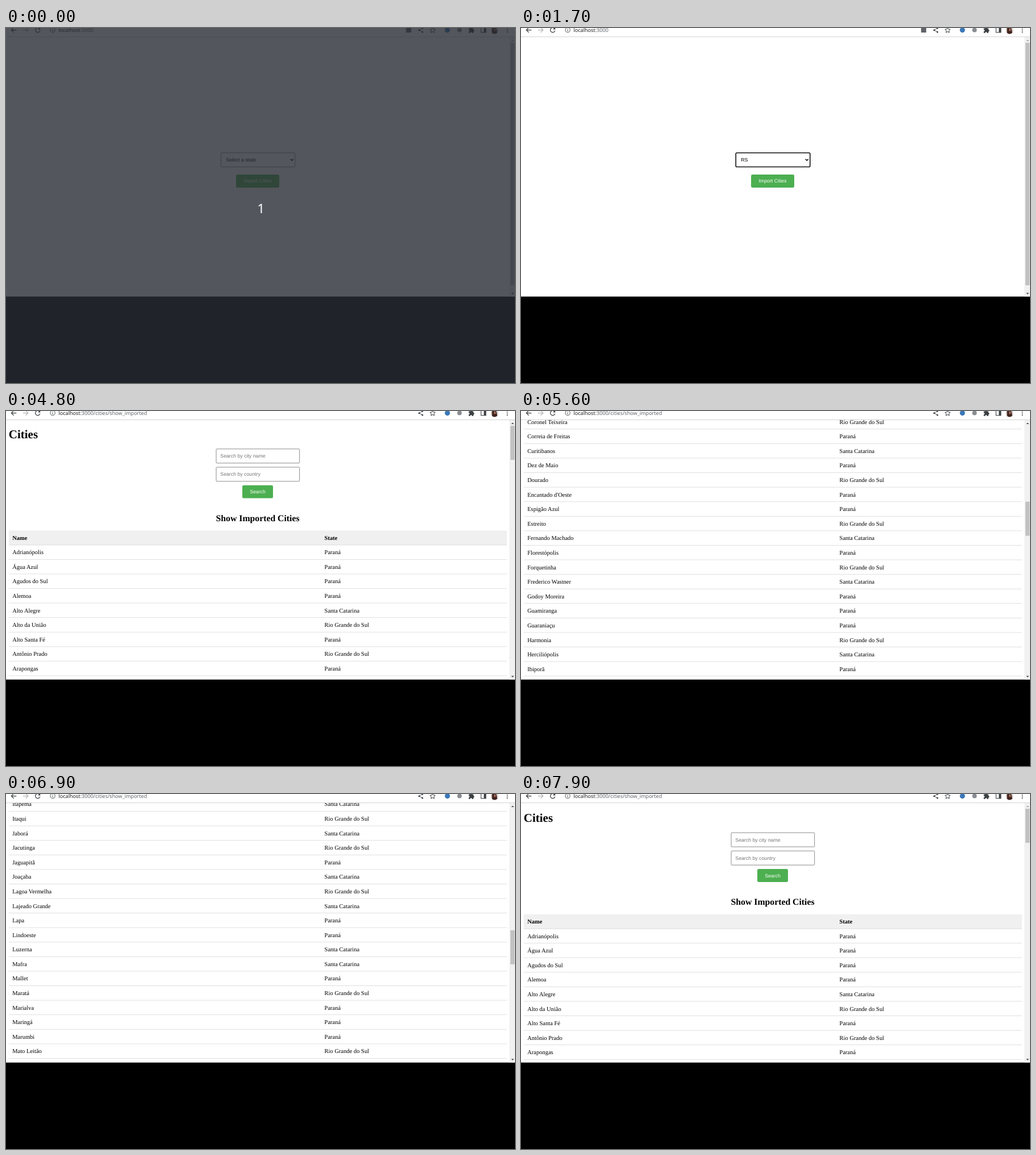
These frames come from a looping animation (896 by 625 pixels, 8000 ms). An HTML page:

```html
<!DOCTYPE html>
<html lang="en">
<head>
<meta charset="utf-8">
<title>City import</title>
<style>
  html, body { margin: 0; width: 100%; height: 100%; overflow: hidden; background: #000; }
  svg { display: block; width: 896px; height: 625px; text-rendering: geometricPrecision; }
  .sans { font: 8.75px "Liberation Sans", Arial, sans-serif; }
  .serif { font: 10.5px "Liberation Serif", "Times New Roman", serif; }
  .bold { font-weight: bold; }
  .url { font: 9.07px "Noto Sans", "Open Sans", sans-serif; fill: #5f6368; }
  .count { font: 23px "Noto Sans", "Open Sans", sans-serif; fill: #fff; }
  .icon { fill: none; stroke: #3c4043; stroke-width: 1.25; }
  .field { fill: #fff; stroke: #767676; stroke-width: .85; }
  .hint { fill: #757575; }
  .mid { text-anchor: middle; }
  .white { fill: #fff; }
</style>
</head>
<body>
<svg viewBox="0 0 896 625">
  <defs>
    <clipPath id="view"><rect y="16" width="886.2" height="456.8"/></clipPath>
    <clipPath id="face"><circle cx="860" cy="3.8" r="6.6"/></clipPath>
    <filter id="shadow" x="-10%" y="-20%" width="120%" height="150%">
      <feDropShadow dx="0" dy="1" stdDeviation="1.2" flood-opacity=".35"/>
    </filter>
  </defs>
  <rect width="896" height="625"/>
  <rect width="896" height="472.8" fill="#fff"/>

  <g clip-path="url(#view)">
    <g id="form">
      <rect id="select" x="378.2" y="219.8" width="130.6" height="24.7" rx="1.8"/>
      <text id="choice" class="sans" x="387.2" y="235.1"></text>
      <path d="M500.7 230.8l2.5 2.5 2.5-2.5" fill="none" stroke="#000" stroke-width="1.4"/>
      <rect x="405" y="258.1" width="76" height="22.8" rx="2.6" fill="#4caf50"/>
      <text class="sans mid white" x="443" y="272.4">Import Cities</text>
      <g id="popup">
        <rect x="377.8" y="245" width="131.4" height="45.4" fill="#fff" stroke="#c4c4c4" stroke-width=".6" filter="url(#shadow)"/>
        <rect id="mark" x="378.1" width="130.8" height="11.2" fill="#e95420"/>
        <g id="options" class="sans"></g>
      </g>
    </g>
    <g id="list">
      <text class="serif bold" style="font-size:21px" x="4.8" y="49.3">Cities</text>
      <rect id="byName" class="field" x="370" y="68.1" width="146.7" height="24.9" rx="1.2"/>
      <text class="sans hint" x="377.3" y="83.6">Search by city name</text>
      <rect id="byCountry" class="field" x="370" y="100.2" width="146.7" height="24.9" rx="1.2"/>
      <text class="sans hint" x="377.3" y="115.7">Search by country</text>
      <rect x="416" y="132.1" width="54" height="22.8" rx="2.6" fill="#4caf50"/>
      <text class="sans mid white" x="443" y="146.5">Search</text>
      <text class="serif bold mid" style="font-size:15.75px" x="443.1" y="195.2">Show Imported Cities</text>
      <rect x="4.8" y="211.8" width="877" height="25.6" fill="#f0f0f0"/>
      <rect x="4.8" y="236.8" width="877" height=".8" fill="#d8d8d8"/>
      <text class="serif bold" x="11.2" y="227.9">Name</text>
      <text class="serif bold" x="560.6" y="227.9">State</text>
      <g id="rows" class="serif"></g>
    </g>
  </g>

  <g id="scrollbar">
    <rect x="886.2" y="16" width="9.8" height="456.8" fill="#f1f1f1"/>
    <rect id="thumb" x="887.9" width="7.4" fill="#c1c1c1"/>
    <path id="up" d="M889.3 23.1h5l-2.5-2.7z"/>
    <path d="M889.3 466.3h5l-2.5 2.7z" fill="#505050"/>
  </g>

  <g id="toolbar">
    <rect width="896" height="16" fill="#fff"/>
    <rect y="15" width="896" height="1" fill="#d3d3d3"/>
    <path class="icon" d="M18.3 3.5H9.6M13.6-.7L9.4 3.5l4.2 4.2"/>
    <path class="icon" style="stroke:#b4b6b9" d="M30 3.5h8.7M34.7-.7l4.2 4.2-4.2 4.2"/>
    <g id="reload">
      <path class="icon" d="M59 1A4.1 4.1 0 1 0 59.8 4.6"/>
      <path d="M60.3-1.5v4.1h-4.1z" fill="#3c4043"/>
    </g>
    <path id="stop" class="icon" d="M52.2 0l7 7M59.2 0l-7 7"/>
    <circle class="icon" style="stroke-width:.9" cx="82.2" cy="3.4" r="4.1"/>
    <path class="icon" style="stroke-width:1" d="M82.2 2.9v2.8M82.2 1v1"/>
    <text class="url" x="92.4" y="6.5"><tspan fill="#202124">localhost</tspan>:3000<tspan id="path"></tspan></text>
    <rect id="badge" x="704.3" y="-1" width="9" height="9" fill="#5f6368"/>
    <path class="icon" style="stroke-width:.9" d="M733 .3l-5.6 3.4L733 7.1"/>
    <g fill="#3c4043">
      <circle cx="727.3" cy="3.7" r="1.5"/><circle cx="733" cy=".3" r="1.5"/><circle cx="733" cy="7.1" r="1.5"/>
      <circle cx="882.5" cy="-.1" r="1.05"/><circle cx="882.5" cy="3.5" r="1.05"/><circle cx="882.5" cy="7.1" r="1.05"/>
      <path d="M814.6.6h2.5a1.6 1.6 0 0 1 3.2 0h2.5v2.5a1.6 1.6 0 0 1 0 3.2v2.4h-2.5a1.6 1.6 0 0 0-3.2 0h-2.5V6.1a1.5 1.5 0 0 0 0-3z"/>
      <path d="M841.2-.8h3.6v8.6h-3.6z"/>
    </g>
    <path class="icon" style="stroke-width:1" d="M751-1.1l1.4 3.1 3.4.4-2.5 2.3.7 3.4-3-1.7-3 1.7.7-3.4-2.5-2.3 3.4-.4z"/>
    <circle cx="777" cy="3.6" r="4.6" fill="#3b78b8"/>
    <circle cx="798.3" cy="3.6" r="4" fill="#8a8d91"/>
    <rect class="icon" style="stroke-width:1.1" x="836.2" y="-.8" width="8.6" height="8.6"/>
    <g clip-path="url(#face)">
      <rect x="853" y="-3" width="14" height="14" fill="#d9cfca"/>
      <path d="M855.5 11V1.5a4 4 0 0 1 7.5-1.5l2.5 11z" fill="#40241f"/>
      <ellipse cx="860.6" cy="3" rx="1.7" ry="2.5" fill="#a9705c"/>
    </g>
  </g>

  <g id="cover">
    <rect width="896" height="625" fill="#282c34" opacity=".8"/>
    <text class="count mid" x="448.8" y="326">1</text>
  </g>
</svg>
<script>
const $ = id => document.getElementById(id);
const show = (id, on) => $(id).setAttribute("display", on ? "inline" : "none");
const set = (id, name, value) => $(id).setAttribute(name, value);

const LOOP = 8000, STEP = 100, ROW = 25.585, OPTION = 11.2;
const STATES = { P: "Paraná", R: "Rio Grande do Sul", S: "Santa Catarina" };

// Each entry starts with the initial of its state.
const TOWNS = `PAdrianópolis,PÁgua Azul,PAgudos do Sul,PAlemoa,SAlto Alegre,RAlto da União,PAlto Santa Fé,
RAntônio Prado,PArapongas,RArroio do Tigre,SArvoredo,PAssaí,SAtalanta,PBandeirantes,RBarra Funda,PBela Vista,
PBoa Esperança,RBom Jesus,SCaçador,PCambará,RCampo Bom,RCapão da Canoa,RCapão do Cedro,RCasca,RCatuípe,
PCentenário do Sul,SCentro Histórico de São José,RCerro Alto,PConcórdia do Oeste,PConselheiro Mairinck,
PCoronel Domingos Soares,RCoronel Teixeira,PCorreia de Freitas,SCuritibanos,PDez de Maio,RDourado,
PEncantado d'Oeste,PEspigão Azul,REstreito,SFernando Machado,PFlorestópolis,RForquetinha,SFrederico Wastner,
PGodoy Moreira,PGuamiranga,PGuaraniaçu,RHarmonia,SHerciliópolis,PIbiporã,SIbirama,PImbituva,RIndependência,
PIporã,PIrati,RItaara,SItapema,RItaqui,SJaborá,RJacutinga,PJaguapitã,SJoaçaba,RLagoa Vermelha,SLajeado Grande,
PLapa,PLindoeste,SLuzerna,SMafra,PMallet,RMaratá,PMarialva,PMaringá,PMarumbi,RMato Leitão,RMontenegro,PMorretes,
RNova Prata,SNova Trento,POrtigueira,RParaí,RPasso Fundo,PPeabiru,PPinhão,SPiratuba,RPlanalto,RPoço das Antas,
RPontão,PPorto Brasílio,RPulador,PRebouças,SRio Bonito,SRio Pinheiros,SRodeio,RSanta Bárbara,PSanta Bárbara,
SSanta Lúcia,PSanta Zélia,RSanto Antônio,RSanto Antônio do Planalto,RSão Caetano,SSão Cristóvão,
PSão Francisco de Imbaú,SSão João Batista`.split(/,\s*/);

$("rows").innerHTML = TOWNS.map((town, i) => {
  const y = 237.4 + i * ROW;
  return `<text x="11.2" y="${y + 16.2}">${town.slice(1)}</text>` +
    `<text x="560.6" y="${y + 16.2}">${STATES[town[0]]}</text>` +
    `<rect x="4.8" y="${y + ROW - .75}" width="877" height=".8" fill="#d8d8d8"/>`;
}).join("");

const labels = ["Select a state", "PR", "RS", "SC"].map((text, i) => {
  const el = document.createElementNS("http://www.w3.org/2000/svg", "text");
  el.textContent = text;
  el.setAttribute("x", 387.2);
  el.setAttribute("y", 253.8 + i * OPTION);
  return $("options").appendChild(el);
});

// Scroll keys: time, offset, speed per step.
const KEYS = [
  [4700, 0, 0], [4800, 1.3, 12], [5600, 1024, 175], [6300, 2361.7, 40],
  [6400, 2361.7, 0], [7300, 752, -175], [7900, 0, -10]
];

function scrollAt(t) {
  if (t <= KEYS[0][0]) return 0;
  const i = KEYS.findIndex(k => t <= k[0]);
  if (i < 0) return 0;
  const [t0, a, va] = KEYS[i - 1], [t1, b, vb] = KEYS[i];
  if (a === b) return a;
  const n = (t1 - t0) / STEP, u = (t - t0) / (t1 - t0), w = 1 - u;
  return a * w * w * (1 + 2 * u) + b * u * u * (3 - 2 * u) + n * u * w * (va * w - vb * u);
}

function draw(now) {
  const t = Math.floor(now % LOOP / STEP) * STEP;
  const during = (from, to) => t >= from && t < to;
  const listed = t >= 2600, loading = during(2100, 2600), focus = during(300, 2000);

  show("cover", t < 100);
  show("form", !listed);
  show("list", listed);
  show("badge", !listed);
  show("reload", !loading);
  show("stop", loading);
  $("path").textContent = listed ? "/cities/show_imported" : "";

  $("choice").textContent = labels[t < 1700 ? 0 : 2].textContent;
  set("select", "fill", "#fff");
  set("select", "stroke", focus ? "#101010" : "#767676");
  set("select", "stroke-width", focus ? 1.6 : .85);
  show("popup", during(300, 1700));
  const picked = t < 600 ? 0 : t < 700 ? 1 : 2;
  set("mark", "y", 245.2 + picked * OPTION);
  labels.forEach((el, i) => el.setAttribute("fill", i === picked ? "#fff" : "#000"));

  const hover = (id, on) => { $(id).style.stroke = on ? "#4f4f4f" : "#767676"; };
  hover("byName", during(3400, 3500));
  hover("byCountry", during(3500, 3600));

  const offset = scrollAt(t);
  set("list", "transform", `translate(0 ${-offset})`);
  set("thumb", "y", 25.9 + offset / 7.66);
  set("thumb", "height", listed ? 60 : 427);
  set("up", "fill", offset > 0 ? "#505050" : "#a3a3a3");
}

function tick() {
  draw(performance.now());
  requestAnimationFrame(tick);
}
tick();
</script>
</body>
</html>
```
